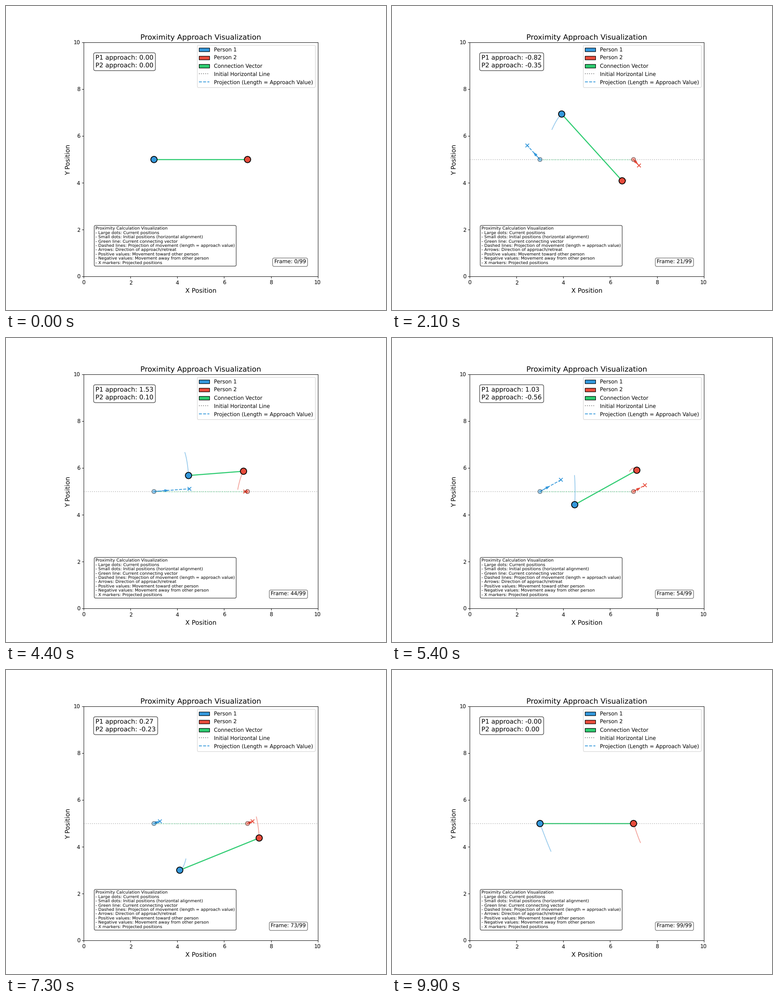
Write a matplotlib script that moves like this. It is 837x669 px and loops after 10 s.

```python
import numpy as np
import matplotlib.pyplot as plt
from matplotlib.animation import FuncAnimation
from matplotlib.lines import Line2D
from matplotlib.patches import Circle, FancyArrow, Patch

plt.rcParams["font.family"] = "DejaVu Sans"
plt.rcParams["text.hinting"] = "no_hinting"

FRAMES = 100
TRAIL = 10
BLUE, RED, GREEN = "#3498db", "#e74c3c", "#2ecc71"
HEAD = dict(width=0.001, head_width=0.1, head_length=0.15)

t = np.linspace(0, 2 * np.pi, FRAMES)
path1 = np.column_stack([3 + 1.5 * np.sin(t / 2), 5 + 2 * np.sin(t)])
path2 = np.column_stack([7 - 0.5 * np.sin(t), 5 - np.sin(1.5 * t)])

# 837 x 669 pixels
fig, ax = plt.subplots(figsize=(10.009, 8), dpi=83.625)
ax.set(xlim=(0, 10), ylim=(0, 10), aspect="equal")
ax.set_title("Proximity Approach Visualization", fontsize=14)
ax.set_xlabel("X Position", fontsize=12)
ax.set_ylabel("Y Position", fontsize=12)


def boxed(x, y, text, size, alpha, **style):
    box = dict(boxstyle="round", facecolor="white", alpha=alpha)
    return ax.text(x, y, text, fontsize=size, bbox=box, **style)


values = boxed(0.5, 9.48, "", 12, 0.8, va="top", linespacing=1.37)
counter = boxed(9.5, 0.5, "", 10, 0.6, ha="right", va="bottom")
boxed(0.5, 0.5, "\n".join([
    "Proximity Calculation Visualization",
    "- Large dots: Current positions",
    "- Small dots: Initial positions (horizontal alignment)",
    "- Green line: Current connecting vector",
    "- Dashed lines: Projection of movement (length = approach value)",
    "- Arrows: Direction of approach/retreat",
    "- Positive values: Movement toward other person",
    "- Negative values: Movement away from other person",
    "- X markers: Projected positions",
]), 8, 0.8, va="bottom", linespacing=1.1)

ax.legend(handles=[
    Patch(facecolor=BLUE, edgecolor="black", label="Person 1"),
    Patch(facecolor=RED, edgecolor="black", label="Person 2"),
    Patch(facecolor=GREEN, edgecolor="black", label="Connection Vector"),
    Line2D([], [], color="gray", ls=":", label="Initial Horizontal Line"),
    Line2D([], [], color=BLUE, ls="--",
           label="Projection (Length = Approach Value)"),
], loc="upper right", fontsize=10, labelspacing=0.54)

link, = ax.plot([], [], color=GREEN, lw=2)
level, = ax.plot([0, 10], [5, 5], ":", color="gray", lw=1.5, alpha=0.5)
base, = ax.plot([3, 7], [5, 5], "--", color=GREEN, lw=1, alpha=0.5)


def disc(center, radius, color, **style):
    return ax.add_patch(Circle(center, radius, fc=color, ec="black", **style))


class Person:
    def __init__(self, path, color):
        self.path, self.start = path, path[0]
        self.trail, = ax.plot([], [], color=color, lw=1.5, alpha=0.5)
        self.proj, = ax.plot([], [], "--", color=color, lw=1.5)
        self.cross, = ax.plot([], [], "x", color=color, ms=7, mew=1.5)
        self.arrow = ax.add_patch(
            FancyArrow(*self.start, 0.1, 0, fc=color, ec=color, **HEAD))
        disc(self.start, 0.09, color, lw=1, alpha=0.5, zorder=2.5)
        self.dot = disc(self.start, 0.135, color, lw=1.5, zorder=2.8)

    def update(self, i, other):
        pos = self.path[i]
        toward = other.path[i] - pos
        toward = toward / np.linalg.norm(toward)
        value = np.dot(pos - self.start, toward) + 0.0
        end = self.start + value * toward
        self.trail.set_data(*self.path[max(0, i - TRAIL):i + 1].T)
        self.proj.set_data(*zip(self.start, end))
        self.cross.set_data([end[0]], [end[1]])
        self.dot.center = pos
        show = abs(value) > 0.1
        self.arrow.set_visible(show)
        if show:
            dx, dy = 0.3 * value * toward
            self.arrow.set_data(x=self.start[0], y=self.start[1],
                                dx=dx, dy=dy)
        return value


one, two = Person(path1, BLUE), Person(path2, RED)


def draw(i):
    v1, v2 = one.update(i, two), two.update(i, one)
    link.set_data(*zip(path1[i], path2[i]))
    level.set_visible(i > 0)
    base.set_visible(i > 0)
    values.set_text(f"P1 approach: {v1:.2f}\nP2 approach: {v2:.2f}")
    counter.set_text(f"Frame: {i}/{FRAMES - 1}")
    return []


anim = FuncAnimation(fig, draw, frames=FRAMES, init_func=lambda: draw(0),
                     interval=100, repeat=True, repeat_delay=0)
plt.show()
```
